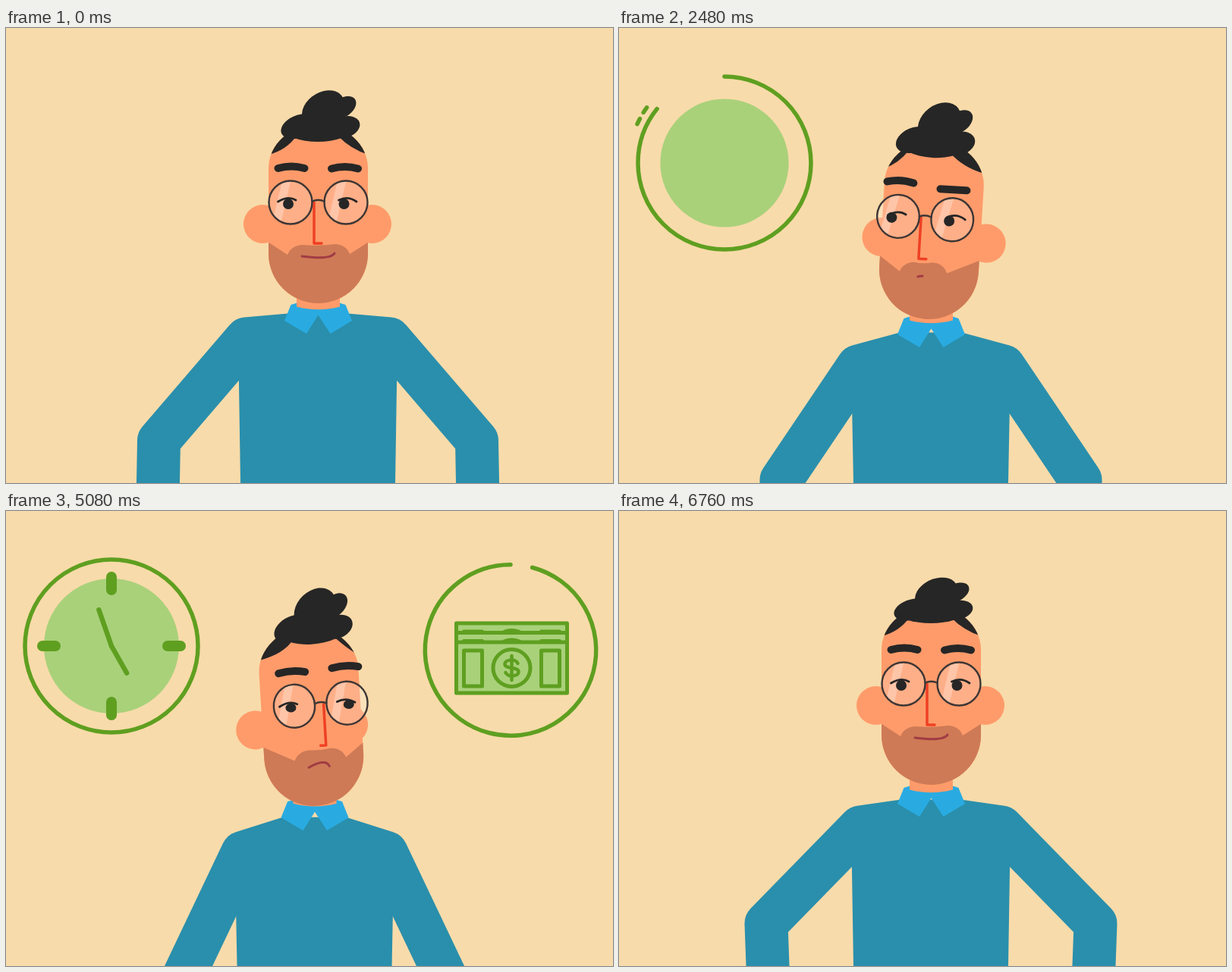
These frames come from a looping animation (800x600 px, 6.8 s). An HTML page with a canvas:

```html
<!DOCTYPE html>
<html lang="en">
<head>
<meta charset="utf-8">
<title>Time and money</title>
<style>
html, body { margin: 0; width: 100%; height: 100%; overflow: hidden; background: #f8dbaa; }
canvas { display: block; width: 800px; height: 600px; }
</style>
</head>
<body>
<canvas id="stage" width="800" height="600"></canvas>
<script>
const ctx = document.getElementById('stage').getContext('2d');
const LOOP = 6800, TAU = Math.PI * 2, DEG = Math.PI / 180;
const C = {
  bg: '#f8dbaa', skin: '#ff9b6a', hair: '#262626', sweater: '#2a8fac', collar: '#29abe2',
  beard: '#ce7a56', mouth: '#a03c44', nose: '#ef4023', frame: '#3d3635',
  green: '#5f9f20', light: '#a9d17a'
};

const clamp = x => Math.max(0, Math.min(1, x));
const lerp = (a, b, k) => a + (b - a) * k;
const inOut = x => x < .5 ? 2 * x * x : 1 - 2 * (1 - x) * (1 - x);
const out = x => 1 - (1 - x) * (1 - x);
const span = (t, start, dur, ease = inOut) => ease(clamp((t - start) / dur));

// ---------- poses ----------
const rest = {
  cx: 411, collarY: 0, neckY: 430, sx: 96, sy: 446, ex: 197, ey: 596, wx: 197,
  hx: 0, hy: 0, tilt: 0, turn: 0, bun: 1, earL: 0, earR: 0,
  browL: 0, browR: 0, flatL: 0, flatR: 0, pupL: -3, pupR: -2.5, lid: 0, closed: 0,
  noseDir: -1, tacheL: 371, tacheR: 453, tacheY: 0,
  mouth: [390, 322, 428, 327, 433, 318]
};
const pose = (p, base = rest) => ({ ...base, ...p });

const tall = pose({ collarY: -18, neckY: 405, sx: 94.5, sy: 410, ex: 209.5, ey: 544, wx: 211.5,
  hy: -21, bun: .92 });
const jump = pose({ neckY: 409, sx: 93, sy: 417, ex: 217, wx: 213, hy: -23, bun: .82 }, tall);
const glanceL = pose({ hx: -2, turn: -5, pupL: -5, pupR: -4, ex: 200, wx: 200 });
const glanceR = pose({ hx: 1, turn: 4, pupL: -1, pupR: 0, ex: 199, wx: 199 });
const left = pose({ hx: -2, tilt: 3, turn: -6.5, earL: 8, earR: 2.5, browR: 6, flatR: 1,
  pupL: -8.5, pupR: -4, lid: 3, tacheL: 373, tacheR: 435.4, tacheY: 3,
  mouth: [397.5, 328.8, 400.5, 327.6, 403.5, 327.4] });
const leftMore = pose({ turn: -9, hx: -3, tilt: 3.5 }, left);
const right = pose({ cx: 406, neckY: 432, sx: 94.7, sy: 449.5, ex: 173.5, ey: 610, wx: 168,
  hx: -6, tilt: -4, turn: 16, earL: -3, earR: -27, browL: -1, browR: -5,
  pupL: -5, pupR: 3, lid: -4, noseDir: 1, tacheL: 389.6, tacheR: 454, tacheY: 3,
  mouth: [408, 333, 430, 321, 431, 332.4] });
const sad = pose({ cx: 409.5, collarY: 1, neckY: 433, sx: 95, sy: 455, ex: 160.5, ey: 621.5, wx: 150,
  hx: -5, hy: 33, turn: -3.7, earL: 5, earR: 2, browL: 12, browR: 12, flatL: 1, flatR: 1,
  closed: 1, tacheL: 366, tacheR: 453, tacheY: 4, mouth: [382, 333, 408, 327, 433, 334] });

const keys = [
  [0, tall], [360, rest], [920, rest], [1200, glanceL, out], [1600, glanceR], [1880, rest],
  [2020, rest], [2480, leftMore], [3200, left], [3440, left], [3960, right], [4900, right],
  [5560, sad], [6500, sad], [6760, jump], [LOOP, tall]
];

function poseAt(t) {
  let i = 1;
  while (t > keys[i][0]) i++;
  const [t0, a] = keys[i - 1], [t1, b, ease = inOut] = keys[i];
  const k = ease((t - t0) / (t1 - t0)), p = {};
  for (const n in a) {
    p[n] = n === 'mouth' ? a.mouth.map((v, j) => lerp(v, b.mouth[j], k)) : lerp(a[n], b[n], k);
  }
  return p;
}

// ---------- drawing helpers ----------
function disc(x, y, rx, ry = rx, rot = 0) {
  ctx.beginPath();
  ctx.ellipse(x, y, rx, ry, rot * DEG, 0, TAU);
  ctx.fill();
}
function stroke(color, width) {
  ctx.strokeStyle = color;
  ctx.lineWidth = width;
  ctx.stroke();
}
function line(color, width, ...pts) {
  ctx.beginPath();
  for (let i = 0; i < pts.length; i += 2) ctx.lineTo(pts[i], pts[i + 1]);
  stroke(color, width);
}
function curve(color, width, x0, y0, qx, qy, x1, y1) {
  ctx.beginPath();
  ctx.moveTo(x0, y0);
  ctx.quadraticCurveTo(qx, qy, x1, y1);
  stroke(color, width);
}
// Arc between two fractions of a turn, clockwise from the top.
function ring(color, width, x, y, r, from, to) {
  if (to - from < .002) return;
  ctx.beginPath();
  ctx.arc(x, y, r, (from - .25) * TAU, (to - .25) * TAU);
  stroke(color, width);
}

// ---------- man ----------
function drawBody(p) {
  const half = s => [[p.cx + s * p.wx, p.ey + 110], [p.cx + s * p.ex, p.ey],
    [p.cx + s * p.sx, p.sy], [p.cx + s * 37, p.neckY]];
  line(C.sweater, 57, ...half(-1).flat(), ...half(1).reverse().flat());
  ctx.fillStyle = C.sweater;
  ctx.beginPath();
  ctx.moveTo(p.cx - 105, p.sy - 5);
  ctx.lineTo(p.cx - 102, 600);
  ctx.lineTo(p.cx + 102, 600);
  ctx.lineTo(p.cx + 105, p.sy - 5);
  ctx.lineTo(p.cx + 37, p.neckY);
  ctx.lineTo(p.cx - 37, p.neckY);
  ctx.fill();

  ctx.save();
  ctx.translate(p.cx + .5, p.collarY);
  ctx.fillStyle = C.collar;
  ctx.beginPath();
  for (const [x, y] of [[-28, 380.5], [-36, 383], [-44.5, 404], [-15.5, 421], [0, 396.5],
    [16, 421], [44.5, 404], [36, 383], [28, 380.5]]) ctx.lineTo(x, y);
  ctx.fill();
  ctx.fillStyle = C.skin;
  ctx.beginPath();
  ctx.moveTo(-28.5, 345);
  ctx.lineTo(-28.5, 385.5);
  ctx.quadraticCurveTo(0, 393, 28.5, 385.5);
  ctx.lineTo(28.5, 345);
  ctx.fill();
  ctx.restore();
}

function facePath() {
  ctx.beginPath();
  ctx.ellipse(411.5, 206, 65.5, 58, 0, Math.PI, TAU);
  ctx.lineTo(477, 318.5);
  ctx.arc(411.5, 318.5, 65.5, 0, Math.PI);
  ctx.closePath();
}

function drawHair(p) {
  const h = p.turn * .8;
  ctx.fillStyle = C.hair;
  ctx.beginPath();
  ctx.moveTo(345, 188.5);
  ctx.quadraticCurveTo(370 + h, 182, 383 + h, 163);
  ctx.lineTo(383 + h, 140);
  ctx.lineTo(340, 140);
  ctx.fill();
  ctx.beginPath();
  ctx.moveTo(478, 188);
  ctx.quadraticCurveTo(456 + h, 182, 437 + h, 163);
  ctx.lineTo(437 + h, 140);
  ctx.lineTo(483, 140);
  ctx.fill();
}

function drawBun(p) {
  ctx.save();
  ctx.translate(p.turn * .5, 171);
  ctx.scale(1, p.bun);
  ctx.translate(0, -171);
  ctx.fillStyle = C.hair;
  disc(418, 124, 31, 23, -40);
  disc(444, 122, 20, 13, -40);
  disc(386, 149, 25, 16, -25);
  disc(446, 150, 21, 15, -20);
  disc(411, 152, 44, 19);
  ctx.restore();
}

function drawBeard(p) {
  const l = p.tacheL, r = p.tacheR, y = 307 + p.tacheY;
  ctx.fillStyle = C.beard;
  ctx.beginPath();
  ctx.moveTo(340, 300);
  ctx.lineTo(l, 320 + p.tacheY);
  ctx.bezierCurveTo(l + 3, y + 5, l + 11, y, l + 20, y);
  ctx.quadraticCurveTo((l + r) / 2, y + 2 - p.closed * 3, r - 20, y - 1);
  ctx.bezierCurveTo(r - 10, y - 1, r - 3, y + 4, r, 319 + p.tacheY);
  ctx.lineTo(483, 300);
  ctx.lineTo(483, 390);
  ctx.lineTo(340, 390);
  ctx.fill();
}

function drawEye(p, side) {
  const x = 411.5 + side * (36.5 - .01 * p.turn * p.turn) + p.turn;
  const rx = 28.5 - .008 * p.turn * p.turn;
  const pupil = side < 0 ? p.pupL : p.pupR;
  ctx.save();
  ctx.translate(x, 251);
  ctx.beginPath();
  ctx.ellipse(0, 0, rx, 28.5, 0, 0, TAU);
  ctx.save();
  ctx.clip();
  ctx.fillStyle = 'rgba(255,255,255,.2)';
  ctx.fillRect(-30, -30, 60, 60);
  line('rgba(255,255,255,.28)', 11, -4, -34, -20, 34);
  ctx.restore();

  const k = p.closed, s = side < 0 ? 1 : -1;
  const off = side < 0 ? 0 : -.5;
  ctx.fillStyle = C.hair;
  if (k < .95) disc(pupil, 2, 7, 7 * (1 - k));
  curve(C.hair, 2.8,
    s * lerp(-16.5, -14.5, k) + off - 2 * (s < 0) * (1 - k) + p.lid, lerp(-1, 4, k),
    s * lerp(-3, -2.5, k) + off + p.lid, lerp(-9, -2.5, k),
    s * lerp(9, 9.5, k) + off - 2 * (s > 0) * (1 - k) + p.lid, lerp(-3, 1, k));
  ctx.beginPath();
  ctx.ellipse(0, 0, rx, 28.5, 0, 0, TAU);
  stroke(C.frame, 2.4);
  ctx.restore();
  return x - side * rx;
}

function drawHead(p) {
  ctx.save();
  ctx.translate(411.5 + p.hx, 318 + p.hy);
  ctx.rotate(p.tilt * DEG);
  ctx.translate(-411.5, -318);

  ctx.fillStyle = C.skin;
  disc(338.5 + p.earL, 279.5, 25.5);
  disc(482.5 + p.earR, 279.5, 25.5);
  facePath();
  ctx.fill();
  ctx.save();
  facePath();
  ctx.clip();
  drawHair(p);
  drawBeard(p);
  ctx.restore();
  drawBun(p);
  curve(C.mouth, 3, ...p.mouth);

  const nx = 411.5 + 5.5 * p.noseDir + p.turn;
  line(C.nose, 3.5, nx, 251, nx, 305, nx - 10 * p.noseDir, 305);
  const a = drawEye(p, -1), b = drawEye(p, 1);
  curve(C.frame, 2.4, a, 249.5, (a + b) / 2, 246, b, 249.5);

  const brow = (x, y, flat) =>
    curve(C.hair, 10, x - 17.5, y, x, y - 5 * (1 - flat), x + 17.5, y);
  brow(376 + p.turn, 206 + p.browL - p.flatL, p.flatL);
  brow(446.5 + p.turn, 206.5 + p.browR - p.flatR, p.flatR);
  ctx.restore();
}

// ---------- icons ----------
function openRing(x, y, r, p) {
  ring(C.green, 5.5, x, y, r, 0, p);
  if (p < .04 || p === 1) return;
  const far = r + 10 + 13 * (1 - p);
  for (const back of [.014, .036]) {
    ring(C.green, 5.5, x, y, far, p - back - .005, p - back + .005);
  }
}

function drawClock(t) {
  if (t < 2040 || t > 6160) return;
  const x = 139, y = 178;
  const size = span(t, 2200, 360, out), gone = span(t, 5450, 400);
  if (size > 0 && gone < 1) {
    ctx.fillStyle = C.light;
    ctx.beginPath();
    if (gone > 0) ctx.moveTo(x, y);
    ctx.arc(x, y, 89 * size, (gone - .25) * TAU, .75 * TAU);
    ctx.fill();
  }
  const wipe = span(t, 5560, 450);
  if (wipe > 0) {
    const grow = 1 - (1 - clamp((t - 5560) / 450)) ** 3;
    ring(C.green, 6, x, y, 114 + 8 * grow, wipe, 1);
  } else {
    openRing(x, y, 114, span(t, 2040, 600));
  }
  ring(C.light, 5.5, x, y, 38, wipe, span(t, 5520, 306));

  const leave = 1 - span(t, 5400, 200);
  const tick = span(t, 2600, 260, out) * leave;
  if (tick > 0) for (let i = 0; i < 4; i++) {
    const dx = Math.sin(i * TAU / 4), dy = -Math.cos(i * TAU / 4);
    const r0 = 82.5 - 8.5 * tick, r1 = 82.5 + 8.5 * tick;
    line(C.green, 14 * tick, x + dx * r0, y + dy * r0, x + dx * r1, y + dy * r1);
  }
  const hand = span(t, 2700, 200, out) * leave;
  if (hand > 0) {
    const u = Math.max(0, t - 4000);
    const minute = .287 * Math.max(0, t - 2882) + 6e-5 * u * u;
    const needle = (deg, len) => line(C.green, 6.5, x, y,
      x + Math.sin(deg * DEG) * len * hand, y - Math.cos(deg * DEG) * len * hand);
    needle(minute, 50.5);
    needle(88 + minute / 11.2, 41);
  }
}

function drawBill() {
  ctx.fillStyle = C.light;
  ctx.beginPath();
  ctx.rect(-21, -73, 67, 146);
  ctx.fill();
  stroke(C.green, 5);
  ctx.strokeRect(-10, -63, 47, 24);
  ctx.strokeRect(-10, 39, 47, 24);
  ctx.beginPath();
  ctx.arc(13, 0, 24.5, 0, TAU);
  ctx.stroke();
  ctx.save();
  ctx.translate(13, 0);
  ctx.rotate(-Math.PI / 2);
  ctx.beginPath();
  ctx.moveTo(8, -6);
  ctx.bezierCurveTo(6, -12, -9, -12, -9, -5);
  ctx.bezierCurveTo(-9, 2, 9, -2, 9, 5);
  ctx.bezierCurveTo(9, 12, -6, 12, -8, 6);
  stroke(C.green, 4.5);
  line(C.green, 4.5, 0, -16, 0, 16);
  ctx.restore();
}

function drawMoney(t) {
  if (t < 3480 || t > 6160) return;
  const x = 665, y = 183.5;
  const wipe = span(t, 5000, 560);
  if (wipe > 0) ring(C.green, 5.5, x, y, 109 + 14 * out(clamp((t - 5000) / 560)), wipe, 1);
  else openRing(x, y, 109, span(t, 3480, 600));

  const size = span(t, 3680, 280, out) * (1 - span(t, 5300, 260));
  if (size > 0) {
    ctx.save();
    ctx.translate(666.5, 194);
    ctx.rotate(span(t, 3900, 900) * Math.PI / 2);
    ctx.scale(size, size);
    ctx.lineJoin = 'round';
    const fan = span(t, 3720, 260, out);
    for (let i = 2; i >= 0; i--) {
      ctx.save();
      ctx.translate(-12.5 * i * fan, 0);
      drawBill();
      ctx.restore();
    }
    ctx.restore();
  }

  const far = 95 * span(t, 5640, 320, out), near = 95 * span(t, 5760, 320, out);
  if (far - near > .5) for (let i = 0; i < 4; i++) {
    const dx = Math.sin(i * TAU / 4), dy = -Math.cos(i * TAU / 4);
    line(C.green, 5, x + dx * near, y + dy * near, x + dx * far * .97, y + dy * far * .97);
  }
}

function draw(now) {
  const t = now % LOOP;
  ctx.lineCap = ctx.lineJoin = 'round';
  ctx.fillStyle = C.bg;
  ctx.fillRect(0, 0, 800, 600);
  drawClock(t);
  drawMoney(t);
  const p = poseAt(t);
  drawBody(p);
  drawHead(p);
}

let start = null;
function tick(now) {
  if (start === null) start = now;
  draw(Math.max(0, now - start));
  requestAnimationFrame(tick);
}
draw(0);
requestAnimationFrame(tick);
</script>
</body>
</html>
```
